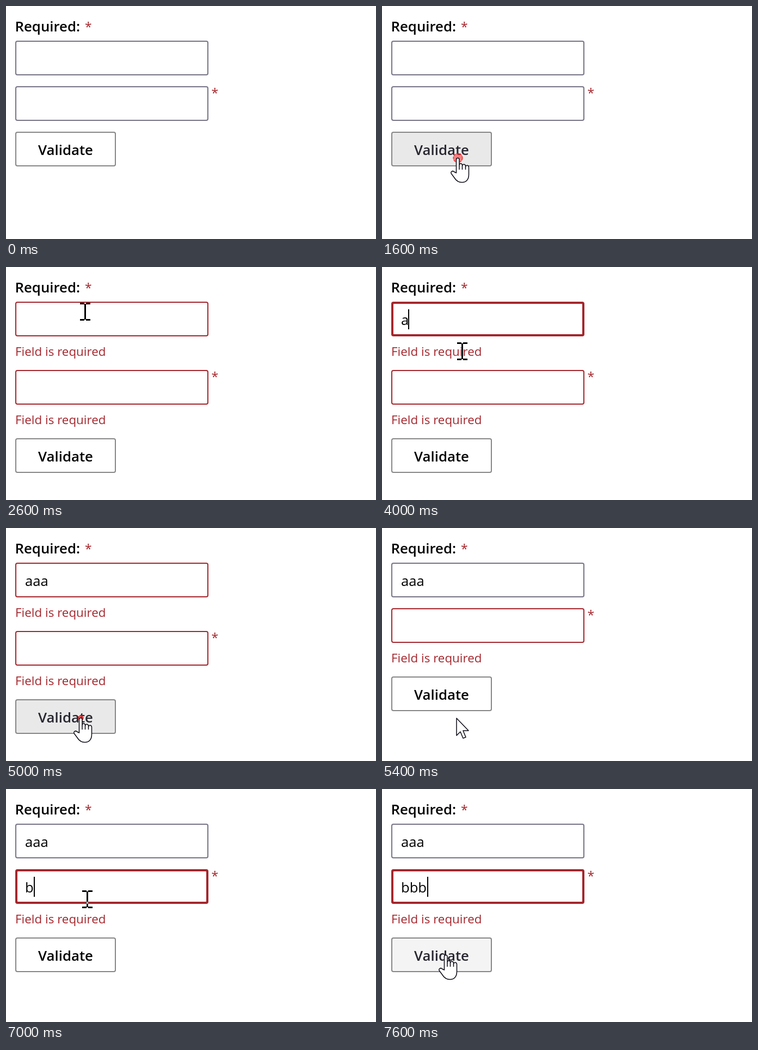
Write an HTML page with a canvas that moves like this. It is 680 px wide and 430 px high and loops after 8000 ms.

```html
<!DOCTYPE html>
<html lang="en">
<head>
<meta charset="utf-8">
<title>Required fields</title>
<style>
html, body { margin: 0; width: 680px; height: 430px; overflow: hidden; background: #fff; }
canvas { display: block; }
</style>
</head>
<body>
<canvas id="stage" width="680" height="430"></canvas>
<script>
const ctx = document.getElementById('stage').getContext('2d');
const LOOP = 8000;
const RED = '#a4262c';
const FAMILY = '"Open Sans", "Noto Sans", sans-serif';

// Each step changes only the listed parts of the form; ring lasts one step.
const steps = [
  { t: 0, cursor: '', a: '', b: '', err1: 0, err2: 0, focus: 0, caret: false, button: 'rest' },
  { t: 400, cursor: 'arrow', x: 207, y: 307 },
  { t: 600, cursor: 'hand', x: 139, y: 281, button: 'hover' },
  { t: 1600, button: 'press', ring: 9 },
  { t: 1800, button: 'hover', ring: 12 },
  { t: 2000, cursor: 'arrow', button: 'rest', err1: .5, err2: .5 },
  { t: 2200, err1: 1, err2: 1 },
  { t: 2600, cursor: 'beam', x: 145.5, y: 82.5 },
  { t: 2800, focus: 1, caret: true, ring: 9 },
  { t: 3000, ring: 12 },
  { t: 3200 },
  { t: 3400, caret: false, x: 146.5, y: 120.5 },
  { t: 3600, x: 147.5, y: 155.5 },
  { t: 4000, a: 'a', caret: true },
  { t: 4200, a: 'aa' },
  { t: 4400, a: 'aaa' },
  { t: 4600, cursor: 'hand', x: 137, y: 373, button: 'hover' },
  { t: 4800, x: 137, y: 360 },
  { t: 5000, y: 351, focus: 0, caret: false, button: 'press', ring: 5 },
  { t: 5200, button: 'hover', ring: 11 },
  { t: 5400, cursor: 'arrow', button: 'rest', err1: 0 },
  { t: 5800, cursor: 'hand', y: 290, button: 'hover' },
  { t: 6000, cursor: 'beam', x: 138.5, y: 197.5, button: 'rest' },
  { t: 6200, focus: 2, caret: true, ring: 12 },
  { t: 6400 },
  { t: 6600, x: 149.5, y: 203.5, caret: false },
  { t: 7000, b: 'b', caret: true },
  { t: 7200, b: 'bb' },
  { t: 7400, b: 'bbb' },
  { t: 7600, cursor: 'hand', x: 117, y: 307, button: 'hover' }
];

function stateAt(time) {
  const state = {};
  for (const step of steps) {
    if (step.t > time) break;
    Object.assign(state, { ring: 0 }, step);
  }
  return state;
}

function text(str, x, y, size, color, weight = 400) {
  ctx.font = `${weight} ${size}px ${FAMILY}`;
  ctx.fillStyle = color;
  ctx.fillText(str, x, y);
}

function box(x, y, w, h, line, color, fill) {
  ctx.beginPath();
  ctx.roundRect(x, y, w, h, 4);
  ctx.fillStyle = color;
  ctx.fill();
  ctx.beginPath();
  ctx.roundRect(x + line, y + line, w - 2 * line, h - 2 * line, line > 2 ? 1 : 2);
  ctx.fillStyle = fill;
  ctx.fill();
}

// Draws an input with its error and returns the y of the next row.
function field(y, value, advance, err, focused, caret) {
  box(17, y, 355, 64, focused ? 4 : 2, err ? RED : '#767386', '#fff');
  text(value, 35, y + 43, 25.6, '#000');
  if (caret) {
    ctx.fillStyle = '#000';
    ctx.fillRect(35 + Math.floor(value.length * advance), y + 14, 2, 37);
  }
  if (!err) return y + 84;
  ctx.globalAlpha = err;
  text('Field is required', 17, y + 100 - (1 - err) * 12, 22.4, RED);
  ctx.globalAlpha = 1;
  return y + 126;
}

function button(y, mode) {
  const fill = { rest: '#fff', hover: '#f4f4f4', press: '#e9e9e9' }[mode];
  box(17, y, 185, 64, 2, '#868686', fill);
  text('Validate', 59, y + 43, 25.8, mode === 'rest' ? '#000' : '#272630', 600);
}

function ring(x, y, r) {
  const fade = 1 - (r - 5) / 13;
  ctx.beginPath();
  ctx.arc(x, y, r, 0, 7);
  ctx.fillStyle = `rgba(255,40,40,${.2 + .5 * fade})`;
  ctx.fill();
  ctx.beginPath();
  ctx.arc(x, y, r - .75, 0, 2 * Math.PI);
  ctx.setLineDash([4, 2]);
  ctx.lineWidth = 1.5;
  ctx.strokeStyle = `rgba(225,25,30,${.3 + .6 * fade})`;
  ctx.stroke();
  ctx.setLineDash([]);
}

const arrowPath = new Path2D('M0 0V32L7 25L12 37L17 35L12 23H22Z');
const handPath = new Path2D('M-2.5 27V2.5C-2.5-1.5 3-1.5 3 2.5V14' +
  'C3 8.5 8.5 8.5 8.5 13.5V15C8.5 10 14.5 10 14.5 15V16.5C14.5 12 20.5 12 20.5 17' +
  'V30C20.5 40 15 44.5 8 44.5C1 44.5-3 41-6 36L-11.5 28.5C-14 25-9 22-6.5 25Z');
const fingers = new Path2D('M3 14V21M8.5 15V21M14.5 16V21');

const cursors = {
  arrow() { outline(arrowPath); },
  hand() {
    outline(handPath);
    ctx.stroke(fingers);
  },
  // The text pointer inverts whatever lies below it.
  beam() {
    ctx.globalCompositeOperation = 'difference';
    ctx.fillStyle = '#fff';
    for (const y of [-16.5, 13.5]) {
      ctx.fillRect(-9.5, y, 8, 3);
      ctx.fillRect(1.5, y, 8, 3);
    }
    ctx.fillRect(-1.5, -14.5, 3, 29);
  }
};

function outline(path) {
  ctx.lineJoin = 'round';
  ctx.lineWidth = 1.5;
  ctx.fillStyle = '#fff';
  ctx.strokeStyle = '#0c0a14';
  ctx.fill(path);
  ctx.stroke(path);
}

function draw(s) {
  ctx.fillStyle = '#fff';
  ctx.fillRect(0, 0, 680, 430);
  text('Required:', 16.5, 47, 25.8, '#000', 600);
  text('*', 145, 47, 23, RED);
  const second = field(64, s.a, 13.9, s.err1, s.focus === 1, s.caret && s.focus === 1);
  text('*', 377.5, second + 21, 23, RED);
  const last = field(second, s.b, 16.3, s.err2, s.focus === 2, s.caret && s.focus === 2);
  button(last, s.button);
  if (!s.cursor) return;
  if (s.ring) ring(s.x - (s.cursor === 'beam' ? 2.5 : -.5), s.y - .5, s.ring);
  ctx.save();
  ctx.translate(s.x, s.y);
  cursors[s.cursor]();
  ctx.restore();
}

function tick() {
  draw(stateAt(performance.now() % LOOP));
  requestAnimationFrame(tick);
}
tick();
</script>
</body>
</html>
```
